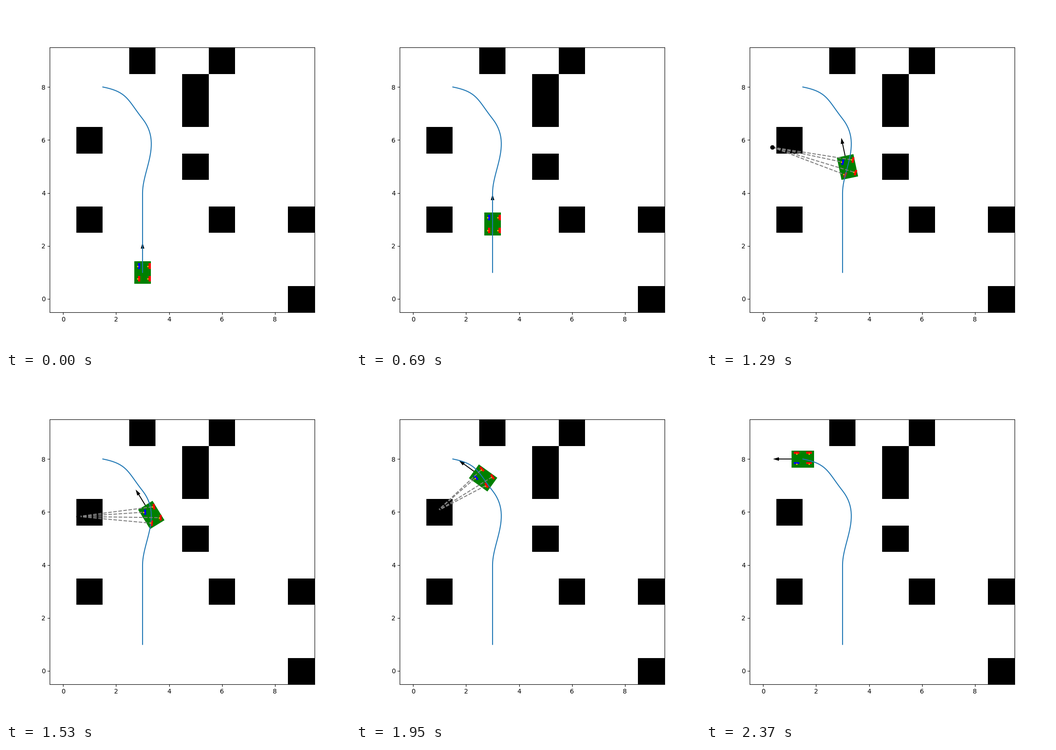
Recreate the animation shown at these times as a matplotlib script. Size 748 by 748 pixels, loop 2.4 s.

```python
from itertools import product

import numpy as np
import matplotlib.pyplot as plt
from matplotlib.animation import FuncAnimation
from matplotlib.patches import Polygon

SIZE, DPI = 748, 100
UP, DIAGONAL, LEFT = np.pi / 2, 3 * np.pi / 4, np.pi

# Blocked cells: column -> rows.
BLOCKED = {1: (3, 6), 3: (9,), 5: (5, 7, 8), 6: (3, 9), 9: (0, 3)}

# Pose (x, y, heading) and its change per step at each waypoint.
WAYPOINTS = [
    ((3, 1, UP), (0, 0, 0)),
    ((3, 4, UP), (0, 0.105, 0)),
    ((3, 6.8, DIAGONAL), (-0.089, 0.113, 0.012)),
    ((1.5, 8, LEFT), (-0.146, 0.0285, 0.0085)),
]
LEG_POSES = (34, 26, 20)


def drive(start, end, count):
    """Poses and rates on the cubic between two waypoints."""
    (p0, v0), (p1, v1) = np.array(start, float), np.array(end, float)
    steps = count - 1
    m0, m1, gap = v0 * steps, v1 * steps, p1 - p0
    u = np.linspace(0, 1, count)[:, None]
    pose = (p0 + gap * (3 * u**2 - 2 * u**3)
            + m0 * (u**3 - 2 * u**2 + u) + m1 * (u**3 - u**2))
    rate = (gap * 6 * u * (1 - u)
            + m0 * (3 * u**2 - 4 * u + 1) + m1 * (3 * u**2 - 2 * u))
    # The wheels point straight ahead wherever two legs meet.
    rate[[0, -1], 2] = 0
    return pose, rate


legs = [drive(*leg) for leg in zip(WAYPOINTS, WAYPOINTS[1:], LEG_POSES)]
poses, rates = (np.vstack(part) for part in zip(*legs))


def turning_center(pose, rate):
    if abs(rate[2]) < 1e-6:
        return None
    return pose[:2] + np.array([-rate[1], rate[0]]) / rate[2]


def place(points, origin, angle):
    """Rotate local (forward, left) points by angle and move them to origin."""
    c, s = np.cos(angle), np.sin(angle)
    return np.asarray(points) @ np.array([[c, s], [-s, c]]) + origin


def box(length, width, left=0.0):
    a, b = length / 2, width / 2
    return [(-a, left - b), (a, left - b), (a, left + b), (-a, left + b)]


def arrow_outline(length=1.125, head=0.225, half_head=0.068, half_shaft=0.017):
    neck = length - head
    side = [(0, half_shaft), (neck, half_shaft), (neck, half_head), (length, 0)]
    return side + [(x, -y) for x, y in reversed(side)]


BODY, ARROW = box(0.86, 0.64), arrow_outline()
HUBS = list(product((0.24, -0.24), (0.195, -0.195)))

fig, ax = plt.subplots(figsize=(SIZE / DPI, SIZE / DPI), dpi=DPI)
grid = np.zeros((10, 10))
for column, rows in BLOCKED.items():
    grid[list(rows), column] = 1
ax.imshow(grid, cmap="binary", origin="lower", interpolation="nearest")
ax.plot(poses[:, 0], poses[:, 1], color="C0", lw=1.5, zorder=2)


def add_shape(color, zorder):
    shape = Polygon(np.zeros((3, 2)), fc=color, ec="none", zorder=zorder)
    return ax.add_patch(shape)


arrow = add_shape("black", 1)
body = add_shape("green", 1.1)
wheels = [add_shape("blue" if i == 0 else "red", 1.2) for i in range(len(HUBS))]
hub_dots, = ax.plot([], [], "o", color="orange", ms=2.4, mew=0, zorder=2.1)
spokes = [ax.plot([], [], "--", color="gray", lw=1.5, zorder=2.2)[0] for _ in HUBS]
pivot, = ax.plot([], [], "o", color="black", ms=6, zorder=2.3)
ax.set_xlim(-0.5, 9.5)
ax.set_ylim(-0.5, 9.5)


def update(i):
    origin, heading = poses[i, :2], poses[i, 2]
    center = turning_center(poses[i], rates[i])
    arrow.set_xy(place(ARROW, origin, heading))
    body.set_xy(place(BODY, origin, heading))
    hubs = place(HUBS, origin, heading)
    hub_dots.set_data(hubs[:, 0], hubs[:, 1])
    offset = 0.07 - 0.02 * (heading - UP)
    for hub, wheel, spoke in zip(hubs, wheels, spokes):
        angle = heading
        if center is None:
            spoke.set_data([], [])
        else:
            dx, dy = hub - center
            angle = np.arctan2(dx, -dy)
            spoke.set_data([center[0], hub[0]], [center[1], hub[1]])
        wheel.set_xy(place(box(0.21, 0.08, -offset), hub, angle))
    pivot.set_data(*([], []) if center is None else ([center[0]], [center[1]]))
    return [arrow, body, *wheels, hub_dots, *spokes, pivot]


anim = FuncAnimation(fig, update, frames=len(poses), interval=30, repeat=True,
                     repeat_delay=0, blit=False)
plt.show()
```
